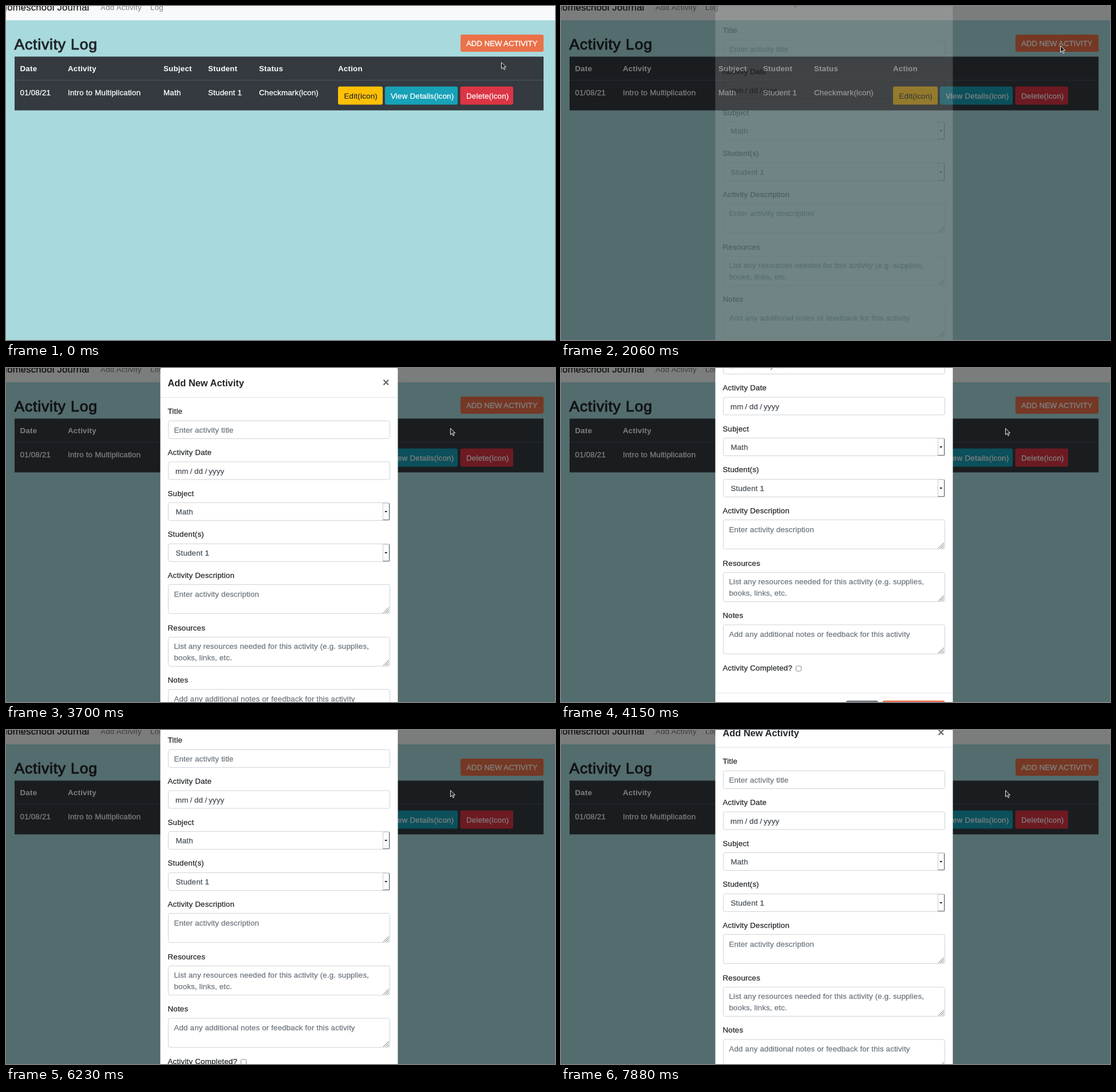
An HTML page that plays this animation: 959 px wide and 584 px high, repeating every 8 s.

```html
<!DOCTYPE html>
<html lang="en">
<head>
<meta charset="utf-8">
<title>Activity Log</title>
<style>
  html, body { margin: 0; width: 100%; height: 100%; overflow: hidden; background: #a8d9dc; }
  svg { display: block; width: 959px; height: 584px; }
  text { font: 13.33px "Liberation Sans", Arial, sans-serif; letter-spacing: .16px; fill: #212529; white-space: pre; }

  .brand { font-size: 16.67px; letter-spacing: .2px; text-anchor: end; fill: #1a1a1a; stroke: #1a1a1a; stroke-width: .2px; }
  .link text { fill: #7c7d7d; letter-spacing: .25px; }
  .heading { font-size: 26.67px; letter-spacing: .75px; stroke: #212529; stroke-width: .95px; }
  .table text { fill: #fff; stroke: #fff; stroke-width: .3px; letter-spacing: .22px; }
  .table .head text { font-weight: bold; stroke: none; }
  .table .dark { fill: #212529; stroke: #212529; stroke-width: .15px; }
  .caps { fill: #fff; stroke: #fff; stroke-width: .35px; letter-spacing: -.1px; }

  .title { font-size: 16.4px; font-weight: bold; letter-spacing: 0; }
  .close { font-size: 20px; font-weight: bold; text-anchor: middle; fill: #666; }
  .label text { stroke: #212529; stroke-width: .25px; letter-spacing: .2px; }
  .hint text { fill: #6c757d; stroke: #6c757d; stroke-width: .25px; }
  .value text { fill: #495057; stroke: #495057; stroke-width: .25px; }
  .field { fill: #fff; stroke: #ced4da; }
  .footer text { fill: #fff; stroke: #fff; stroke-width: .3px; }

  .ring, .backdrop, .modal, .cursor, .arrow, .hand { animation: 8s step-end infinite; }
  .ring { animation-name: ring; }
  .backdrop { animation-name: backdrop; }
  .modal { animation-name: fade, scroll; }
  .cursor { animation-name: move; }
  .arrow { animation-name: arrow; }
  .hand { animation-name: hand; }

  @keyframes ring {
    0% { opacity: 0; }
    12.625% { opacity: .6; }
    14.5% { opacity: 1; }
    25.75% { opacity: 0; }
  }
  @keyframes backdrop {
    0% { opacity: 0; }
    23.875% { opacity: .12; }
    25.75% { opacity: .5; }
  }
  @keyframes fade {
    0% { opacity: 0; }
    25.75% { opacity: .17; }
    27.625% { opacity: 1; }
  }
  @keyframes scroll {
    0% { transform: translateY(-36px); }
    27.625% { transform: translateY(-10px); }
    29.5% { transform: translateY(-1px); }
    31.375% { transform: translateY(0); }
    44.5% { transform: translateY(-3px); }
    46.375% { transform: translateY(-18px); }
    48.25% { transform: translateY(-46px); }
    50% { transform: translateY(-81px); }
    51.875% { transform: translateY(-116px); }
    53.75% { transform: translateY(-154px); }
    55.625% { transform: translateY(-180px); }
    68.75% { transform: translateY(-174px); }
    70.625% { transform: translateY(-160px); }
    72.5% { transform: translateY(-139px); }
    74.375% { transform: translateY(-114px); }
    76% { transform: translateY(-88px); }
    77.875% { transform: translateY(-61px); }
    79.75% { transform: translateY(-38px); }
    81.625% { transform: translateY(-18px); }
    83.5% { transform: translateY(-6px); }
    85.375% { transform: translateY(0); }
    96.625% { transform: translateY(-8px); }
    98.5% { transform: translateY(-24px); }
  }
  @keyframes move {
    0% { transform: translate(865px, 98px); }
    1.875% { transform: translate(862px, 91px); }
    3.75% { transform: translate(858px, 82px); }
    5.5% { transform: translate(856px, 70px); }
    18.25% { transform: translate(865px, 70px); }
    20.125% { transform: translate(872px, 70px); }
    23.875% { transform: translate(872px, 69px); }
    37% { transform: translate(845px, 78px); }
    38.875% { transform: translate(815px, 92px); }
    40.75% { transform: translate(790px, 102px); }
    42.625% { transform: translate(776px, 105px); }
  }
  @keyframes arrow {
    0% { opacity: 1; }
    5.5% { opacity: 0; }
    23.875% { opacity: 1; }
  }
  @keyframes hand {
    0% { opacity: 0; }
    5.5% { opacity: 1; }
    23.875% { opacity: 0; }
  }
</style>
</head>
<body>
<svg viewBox="0 0 959 584">
  <defs>
    <g id="input"><rect class="field" x="283.5" y=".5" width="387" height="31" rx="3"/></g>
    <g id="select">
      <use href="#input"/>
      <rect x="658.5" y="1.5" width="11" height="29" fill="#fff" stroke="#c9cccf"/>
      <path d="M669.5 1.5V30.5H658.5" fill="none" stroke="#70757a" stroke-width="1.2"/>
      <path d="M661.2 15h5l-2.5 2.8z" fill="#111"/>
    </g>
    <g id="area">
      <rect class="field" x="283.5" y=".5" width="387" height="51" rx="3"/>
      <path d="M659 50.5l10-10M662.5 50.5l6.5-6.5M666 50.5l3-3" fill="none" stroke="#555" stroke-width=".9"/>
    </g>
  </defs>

  <rect width="959" height="584" fill="#a8d9dc"/>
  <rect width="959" height="25" fill="#f8f9fa"/>
  <text class="brand" x="145.5" y="8">Homeschool Journal</text>
  <g class="link">
    <text x="165" y="7">Add Activity</text>
    <text x="252" y="7">Log</text>
  </g>

  <text class="heading" x="14.5" y="76">Activity Log</text>
  <rect class="ring" x="792.4" y="47.9" width="148.4" height="34" rx="4.5" fill="#7ec28f"/>
  <rect x="794" y="50" width="145" height="30" rx="3.3" fill="#eb7149"/>
  <text class="caps" x="804" y="70">ADD NEW ACTIVITY</text>

  <g class="table">
    <rect x="15" y="88.5" width="924" height="94" fill="#343a40"/>
    <rect x="15" y="129" width="924" height="1.6" fill="#454d55"/>
    <g class="head">
      <text x="24.5" y="114">Date</text>
      <text x="108" y="114">Activity</text>
      <text x="275" y="114">Subject</text>
      <text x="353" y="114">Student</text>
      <text x="442" y="114">Status</text>
      <text x="580" y="114">Action</text>
    </g>
    <text x="24.5" y="156">01/08/21</text>
    <text x="108" y="156">Intro to Multiplication</text>
    <text x="275" y="156">Math</text>
    <text x="353" y="156">Student 1</text>
    <text x="442" y="156">Checkmark(icon)</text>
    <rect x="580" y="140.7" width="78" height="31.8" rx="3.3" fill="#ffc107"/>
    <rect x="662" y="140.7" width="127" height="31.8" rx="3.3" fill="#17a2b8"/>
    <rect x="793.5" y="140.7" width="92.5" height="31.8" rx="3.3" fill="#dc3545"/>
    <text class="dark" x="590.5" y="161.5">Edit(icon)</text>
    <text x="672" y="161.5">View Details(icon)</text>
    <text x="804" y="161.5">Delete(icon)</text>
  </g>

  <rect class="backdrop" width="959" height="584"/>

  <g class="modal">
    <rect x="269.1" y="1.6" width="415.8" height="741.8" rx="4.5" fill="none" stroke="#000" stroke-opacity=".2" stroke-width=".8"/>
    <rect x="269.5" y="2" width="415" height="741" rx="4" fill="#fff"/>
    <text class="title" x="282.5" y="35">Add New Activity</text>
    <text class="close" x="664" y="35">×</text>
    <path d="M270 54.5h414M270 684.5h414" stroke="#dee2e6"/>

    <g class="label">
      <text x="282.5" y="83">Title</text>
      <text x="282.5" y="155">Activity Date</text>
      <text x="282.5" y="226.5">Subject</text>
      <text x="282.5" y="298">Student(s)</text>
      <text x="282.5" y="370">Activity Description</text>
      <text x="282.5" y="461.5">Resources</text>
      <text x="282.5" y="553">Notes</text>
      <text x="282.5" y="645">Activity Completed?</text>
    </g>

    <use href="#input" y="95"/>
    <use href="#input" y="166.5"/>
    <use href="#select" y="238"/>
    <use href="#select" y="310"/>
    <use href="#area" y="381"/>
    <use href="#area" y="473"/>
    <use href="#area" y="564.5"/>
    <rect x="410.5" y="637" width="9" height="9" rx="2" fill="#fff" stroke="#8b8b8b"/>

    <g class="hint">
      <text x="293.5" y="116">Enter activity title</text>
      <text x="293.5" y="402.5">Enter activity description</text>
      <text x="293.5" y="494">List any resources needed for this activity (e.g. supplies,</text>
      <text x="293.5" y="514">books, links, etc.</text>
      <text x="293.5" y="585.5">Add any additional notes or feedback for this activity</text>
    </g>
    <g class="value">
      <text y="187.5"><tspan x="296">mm</tspan><tspan x="321.5">/</tspan><tspan x="329">dd</tspan><tspan x="347.5">/</tspan><tspan x="354">yyyy</tspan></text>
      <text x="296.5" y="259">Math</text>
      <text x="296.5" y="331">Student 1</text>
    </g>

    <g class="footer">
      <rect x="498" y="697.5" width="56" height="31.7" rx="3.3" fill="#6c757d"/>
      <rect x="561.5" y="697.5" width="109" height="31.7" rx="3.3" fill="#eb7149"/>
      <text x="508.5" y="718">Close</text>
      <text x="572.5" y="718">Save changes</text>
    </g>
  </g>

  <g class="cursor" stroke-linejoin="round">
    <path class="arrow" d="M.5 .5V11.8L3.2 9.3 5 13.5 6.9 12.7 5.1 8.6H8.6Z" fill="#222" stroke="#fff" stroke-width=".9"/>
    <path class="hand" d="M.8 7V2.4a1 1 0 0 1 2 0V5.8q1.5-.7 2.1.3 1.4-.5 1.9.4 1.8-.3 1.8 1.2V10.5L7.4 14.2H2.4L-2 9.2q-.8-1.4.6-1.7 1.1 0 2.2 1.3z" fill="#fff" stroke="#222" stroke-width=".9"/>
  </g>
</svg>
</body>
</html>
```
